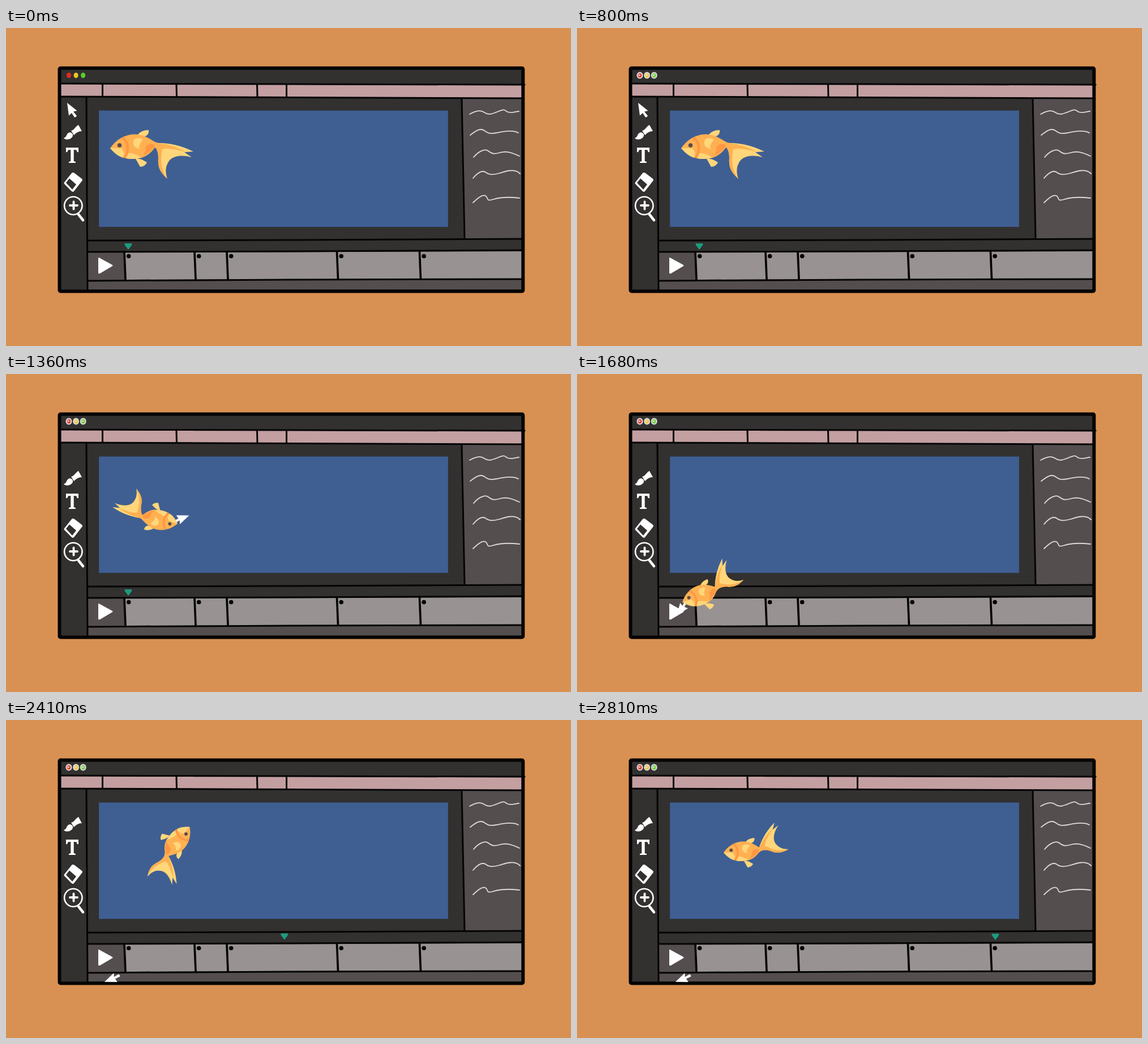
An HTML page that plays this animation: 998 px wide and 561 px high, repeating every 2.89 s.

```html
<!DOCTYPE html>
<html lang="en">
<head>
<meta charset="utf-8">
<title>Goldfish in the editor</title>
<style>
html, body { margin: 0; width: 100%; height: 100%; overflow: hidden; background: #d89153; }
svg { display: block; width: 100vw; height: 100vh; }
.ink { fill: none; stroke: #050404; stroke-width: 3; stroke-linecap: round; }
.wave { fill: none; stroke: #dedada; stroke-width: 1.8; stroke-linecap: round; }
.icon { fill: #fff; }
</style>
</head>
<body>
<svg viewBox="0 0 998 561">
  <rect width="998" height="561" fill="#d89153"/>
  <rect x="95" y="71" width="818" height="393" fill="#323130"/>

  <!-- panels -->
  <path d="M97 99 L912 101 V124 L97 121Z" fill="#c39fa1"/>
  <path d="M805 125 H912 V371 L810 371Z" fill="#554e4e"/>
  <path d="M145 396 H209 V445 H145Z M145 446 L911 444 V461 H145Z" fill="#554e4e"/>
  <path d="M210 396 L911 394 V442 L210 444Z" fill="#989292"/>
  <rect x="164.500" y="146" width="616" height="204.500" fill="#3f5f93" stroke="#3a5789"/>

  <!-- hand drawn lines -->
  <g class="ink">
    <path d="M96 98 L916 100 M96 121 L913 124"/>
    <path d="M170.500 99 V120 M301 100 L301.500 121 M443.500 100 L444 121 M495.500 101 V121"/>
    <path d="M142 123 L144 462 M805 125 L810 371"/>
    <path d="M145 375 L500 374 L912 372 M145 395 L500 394 L912 392 M145 446 L500 444 L910 443"/>
    <g id="cells" stroke-width="3.700"></g>
  </g>
  <rect x="94.500" y="70.700" width="818.800" height="393.800" rx="2" fill="none" stroke="#050404" stroke-width="6"/>

  <g class="wave">
    <path d="M819 152 C830 146 838 144 845 149 S858 152 870 147 S880 145 886 148 S900 147 906 147"/>
    <path d="M820 189 C830 181 838 176 845 181 S855 187 866 185 S895 179 905 185"/>
    <path d="M826 228 C834 218 846 212 852 217 S862 223 872 220 S890 218 907 226"/>
    <path d="M825 265 C833 255 842 250 848 255 S862 259 872 256 S898 247 908 257"/>
    <path d="M825 308 C834 299 842 293 847 296 S848 306 858 303 S880 297 907 300"/>
  </g>

  <!-- tools -->
  <g class="icon">
    <path d="M102 194 C108 193 106 185 113 184 C120 185 120 193 112 196 C108 197 104 197 102 194Z"/>
    <path d="M115 181 C121 180 122 174 128 171 L134 182 C128 182 124 185 120 189Z"/>
    <path d="M106 211 H128 V219 H126 L124 215 H119.700 V235 L123 236 V238 H111 V236 L114.300 235 V215 H110 L108 219 H106Z"/>
    <path d="M104 271 L116 256 Q118 254 121 256 L134 266 Q136 268 134 270 L120 288 Q118 290 116 288 L104 276 Q101 274 104 271Z"/>
    <path d="M106 273 L112 265.500 L124 276 L117 285Z" fill="#323130"/>
  </g>
  <g fill="none" stroke="#fff" stroke-linecap="round">
    <circle cx="118.800" cy="313.500" r="15.700" stroke-width="2.600"/>
    <path d="M119.500 306.500 V319.500 M113 313 H126" stroke-width="3.800"/>
    <path d="M128 329 L136 339" stroke-width="4.500"/>
  </g>

  <g id="lights"></g>
  <g id="dots"></g>
  <path id="head" d="M-6 0 H6 Q7 1 6 3 L1 10 Q0 11.500 -1 10 L-6 3 Q-7 1 -6 0Z" fill="#1f9a80"/>
  <path id="play" class="icon" d="M163 406 Q163 404 166 406 L188 418 Q189 419 188 420 L166 433 Q163 434 163 432Z"/>
  <path id="cursor" class="icon" d="M0 0 Q9 7 17.500 14 L11 15.500 L17 23 Q15 26 13 25.500 L8 18 L3 22.500Z"/>

  <!-- fish, pivot where the tail joins the body -->
  <g id="fish">
    <g id="tail">
      <g transform="translate(-264 -206)">
        <path d="M261 203 C280 202 305 205 331 218 L315 219 L328 228 C305 222 290 227 285 240 C281 248 282 258 285 266 C272 254 268 245 269 230 C269 220 267 212 261 206Z" fill="#ffd67a"/>
        <path d="M261 202 C280 204 300 208 318 219 C300 214 285 211 276 214 C272 235 274 250 285 266 C271 254 268 244 269 230 C269 219 266 212 260 207Z" fill="#ffb152"/>
      </g>
    </g>
    <g transform="translate(-264 -206)">
      <path d="M232 189 C237 183 243 180 252 180 Q253 186 248 190 L238 193Z M228 229 L240 232 L249 237 Q246 244 237 245Z" fill="#ffd67a"/>
      <path d="M184 212 C194 197 210 188 226 187.500 C246 187 257 199 268 203 Q267 209 262 212 C252 226 240 231 224 231 C206 231 193 223 184 212Z" fill="#ffb152"/>
      <path d="M184 212 L203 212 C209 217 210 224 207 229 C197 226 190 219 184 212Z M226 197 C232 193 239 194 242 197 C236 204 234 209 236 214 L228 210 C224 206 224 201 226 197Z M215 221 C222 220 231 224 239 228 C230 231 221 232 212 230Z" fill="#ffd67a"/>
      <path d="M263 207 C258 202 250 204 246 211 C247 216 245 220 242 225 C252 221 259 215 263 207Z" fill="#ff9743"/>
      <path d="M206 193 C217 202 218 219 209 229" fill="none" stroke="#ff9743" stroke-width="4.500"/>
      <circle cx="200.500" cy="207" r="3.700" fill="#594a50"/>
    </g>
  </g>
</svg>
<script>
const LOOP = 2890, STEP = 80;
const WAKE = 800, BITE = 1200, PRESS = 1760, RELEASE = 1930, PLAY = 2090;
const $ = id => document.getElementById(id);

// key poses of the swim; the fish eases from one to the next
const atPlay = { x: 246, y: 379, turn: -17, bend: -72 };
const SWIM = [
  { at: WAKE, x: 264, y: 206, turn: 0, bend: 0 },
  { at: BITE, x: 188, y: 134, turn: -15, bend: -72 },
  { at: 1360, x: 240, y: 252, turn: -165, bend: -7 },
  { at: 1440, x: 335, y: 270, turn: -160, bend: -72 },
  { at: 1680, ...atPlay },
  { at: PLAY + STEP, ...atPlay },
  { at: 2570, x: 303, y: 161, turn: 217, bend: -76 },
  { at: 2810, x: 323, y: 229, turn: 360, bend: -72 }
];

const fill = (id, list, draw) => {
  $(id).innerHTML = list.map(draw).join("");
  return [...$(id).children];
};
const CELLS = [209, 333, 390, 584.5, 730.5];
fill("cells", CELLS, x => `<path d="M${x} 395 L${x + 2} 443"/>`);
fill("dots", CELLS, x => `<circle cx="${x + 7.7}" cy="402.500" r="3.800" fill="#050404"/>`);
const lights = fill("lights", ["#e5281f", "#f0c222", "#5bcc26"], (color, i) =>
  `<g transform="translate(${111 + 12.6 * i} 83.500)">
    <ellipse rx="5.500" ry="6" fill="#dcdad8"/>
    <ellipse rx="4" ry="4.800" fill="${color}"/>
    <path d="M-1.500 1.500 V-1.500 H1.500 M-1.500 .5 H1.500" fill="none" stroke="#eee8e4" stroke-width="1.200"/>
  </g>`);

const place = (el, x, y, turn = 0, size = 1) =>
  el.setAttribute("transform", `translate(${x} ${y}) rotate(${turn}) scale(${size})`);
const progress = (t, from, to) => {
  const k = Math.min(1, Math.max(0, (t - from) / (to - from)));
  return k * k * (3 - 2 * k);
};

function fishAt(t) {
  const i = Math.max(1, SWIM.findIndex(key => key.at >= t));
  const [a, b] = [SWIM[i - 1], SWIM[i]];
  const k = progress(t, a.at, b.at);
  const mix = name => a[name] + (b[name] - a[name]) * k;
  return {
    x: mix("x"), y: mix("y"), turn: mix("turn"), bend: mix("bend"),
    size: 1 - .2 * progress(t, WAKE, BITE)
  };
}

function cursorAt(t, { x, y, turn }) {
  if (t < BITE) return [108, 132, 0];
  if (t >= PLAY) return [174, 462, -82];
  // carried in the mouth
  const a = turn * Math.PI / 180, c = Math.cos(a), s = Math.sin(a);
  return [x - 80 * c - 24 * s, y - 80 * s + 24 * c, turn - 97];
}

function headAt(t) {
  if (t < PLAY) return [216, 380];
  const k = (t - PLAY) / (2810 - PLAY);
  return [294 + 445 * k, 380 - 4 * Math.sin(2.3 * k)];
}

function draw(time) {
  const base = time < PLAY ? 0 : PLAY;
  const t = base + Math.floor((time - base) / STEP) * STEP;
  const fish = fishAt(t);
  place($("fish"), fish.x, fish.y, fish.turn, fish.size);
  place($("tail"), 0, 0, fish.bend);
  place($("cursor"), ...cursorAt(t, fish));
  place($("head"), ...headAt(t));
  $("play").style.fill = time >= PRESS && time < RELEASE ? "#b9b3b3" : "#fff";

  lights.forEach((light, i) => {
    const [ring, lamp, sign] = light.children;
    const lit = t >= 720 - STEP * i;
    ring.style.opacity = sign.style.opacity = lit ? 1 : 0;
    lamp.setAttribute("transform", `scale(${lit ? .8 : 1})`);
  });
}

const start = performance.now();
function tick() {
  draw((performance.now() - start) % LOOP);
  requestAnimationFrame(tick);
}
tick();
</script>
</body>
</html>
```
